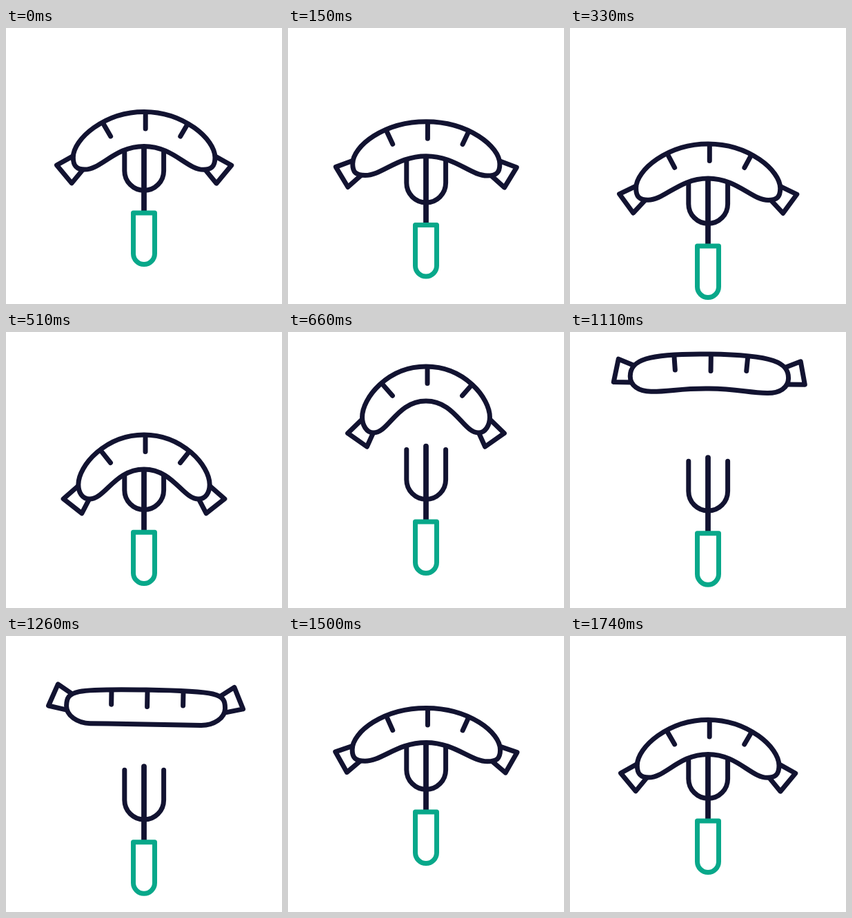
Recreate the animation shown at these times as an HTML page. Size 400x400 px, loop 4770 ms.

```html
<!DOCTYPE html>
<html lang="en">
<head>
<meta charset="utf-8">
<title>Sausage on a fork</title>
<style>
  html, body { margin: 0; width: 100%; height: 100%; overflow: hidden; background: #fff; }
  svg { display: block; width: 100%; height: 100%; }
  path { fill: none; stroke: #121331; stroke-width: 7; stroke-linecap: round; stroke-linejoin: round; }
  #stem { stroke-width: 7.8; }
  #handle { stroke: #08a88a; }
  #body { fill: #fff; }
</style>
</head>
<body>
<svg viewBox="0 0 400 400">
  <g id="fork">
    <path d="M171.8 163.5V207a28.4 28.4 0 0 0 56.8 0V163.5"/>
    <path id="stem" d="M200 158.5V266"/>
    <path id="handle" d="M184.5 268H215.5V327a15.5 15.5 0 0 1-31 0Z"/>
  </g>
  <g id="sausage">
    <path id="tails"/>
    <path id="body"/>
    <path id="marks"/>
  </g>
</svg>
<script>
const LOOP = 4770, STEP = 30, END = 1740;
const REST_BEND = .72, REST_TOP = 121.4;
const APEX_TIME = 955, APEX_TOP = 16;

const el = id => document.getElementById(id);
const smooth = u => u * u * (3 - 2 * u);

// Eases between keys of time, value and the skew of the easing towards that value.
function ease(keys, time) {
  const i = Math.max(1, keys.findIndex(key => key[0] >= time));
  const [t0, v0] = keys[i - 1], [t1, v1, skew = 1] = keys[i];
  return v0 + (v1 - v0) * smooth(((time - t0) / (t1 - t0)) ** skew);
}

// Bend runs from 0, straight, to 1, ends hanging down.
const bendAt = time => ease(
  [[0, REST_BEND], [200, .575], [630, 1], [1275, 0, .8], [1500, .575], [END, REST_BEND, .6]], time);
const forkAt = time => ease(
  [[0, 0], [375, 50], [600, 7], [1290, 31, 1.5], [1500, -13], [END, 0, .6]], time);

function flightAt(time) {
  const rising = (APEX_TIME - time) / 295, falling = (time - APEX_TIME) / 305;
  return APEX_TOP + (rising > 0 ? 34 * rising ** 3.5 : 62 * falling ** 2);
}

// The sausage rides on the fork unless its flight carries it higher.
const topAt = (time, bend) =>
  Math.min(REST_TOP + forkAt(time) + 27 * (bend - REST_BEND), flightAt(time));

const mirror = ([x, y]) => [-x, y];
const line = points => 'M' + points.join('L');
const rotate = ([x, y], angle) => {
  const c = Math.cos(angle), s = Math.sin(angle);
  return [x * c - y * s, x * s + y * c];
};
const rad = degrees => degrees * Math.PI / 180;

// Left half of the outline is drawn from the middle of the top edge, then mirrored.
const tipAt = k => [-115 + 23.5 * k * k, 25 + 78 * k - 29 * k * k];
const lobeAt = k => [-80 - 42.5 * k + 47.5 * k * k, 50 + 47 * k];

function bodyPath(k) {
  const [tx, ty] = tipAt(k), [lx, ly] = lobeAt(k), low = 50;
  const left = [
    [0, 0], [-105 + 110 * k - 61 * k * k, 0],
    [tx, ty - 22 - 6 * k], [tx, ty], [tx, ty + 14 - 3 * k],
    [lx - 19 + 9 * k, ly], [lx, ly], [lx + 28 - 6 * k, ly],
    [-42, low], [0, low]
  ];
  const right = left.map(mirror).reverse();
  return `M0,0C${[...left.slice(1), ...right.slice(1)].join(' ')}Z`;
}

function tailPoints(k) {
  const [tx, ty] = tipAt(k), [lx, ly] = lobeAt(k), lift = (1 - k) ** 2;
  const x = (tx + lx) / 2 - 12.5 * lift, y = (ty + ly) / 2 - 17.5 * lift;
  const angle = rad(23 - 108 * k + 29 * k * k);
  return [[0, -12], [-26.5, -17], [-26.5, 17], [0, 12]]
    .map(point => rotate(point, angle))
    .map(([px, py]) => [x + px, y + py]);
}

function markPoints(k) {
  const x = -52 - 12 * k, y = 2 + 14 * k + 12 * k * k;
  const [dx, dy] = rotate([0, 20], rad(-42 * k));
  return [[x, y], [x + dx, y + dy]];
}

function draw(time) {
  const bend = bendAt(time), drift = (1 - bend) ** 2;
  const tail = tailPoints(bend), mark = markPoints(bend);

  el('fork').setAttribute('transform', `translate(0 ${forkAt(time)})`);
  el('sausage').setAttribute('transform',
    `translate(${200 + 2.5 * drift} ${topAt(time, bend)}) rotate(${drift} 0 30)`);
  el('body').setAttribute('d', bodyPath(bend));
  el('tails').setAttribute('d', line(tail) + line(tail.map(mirror)));
  el('marks').setAttribute('d', line(mark) + line(mark.map(mirror)) + 'M0 2V24.5');
  el('marks').setAttribute('transform', 'translate(2 0)');
}

const start = performance.now();
function tick() {
  const time = (performance.now() - start) % LOOP;
  draw(Math.min(END, Math.floor(time / STEP) * STEP));
  requestAnimationFrame(tick);
}
tick();
</script>
</body>
</html>
```
